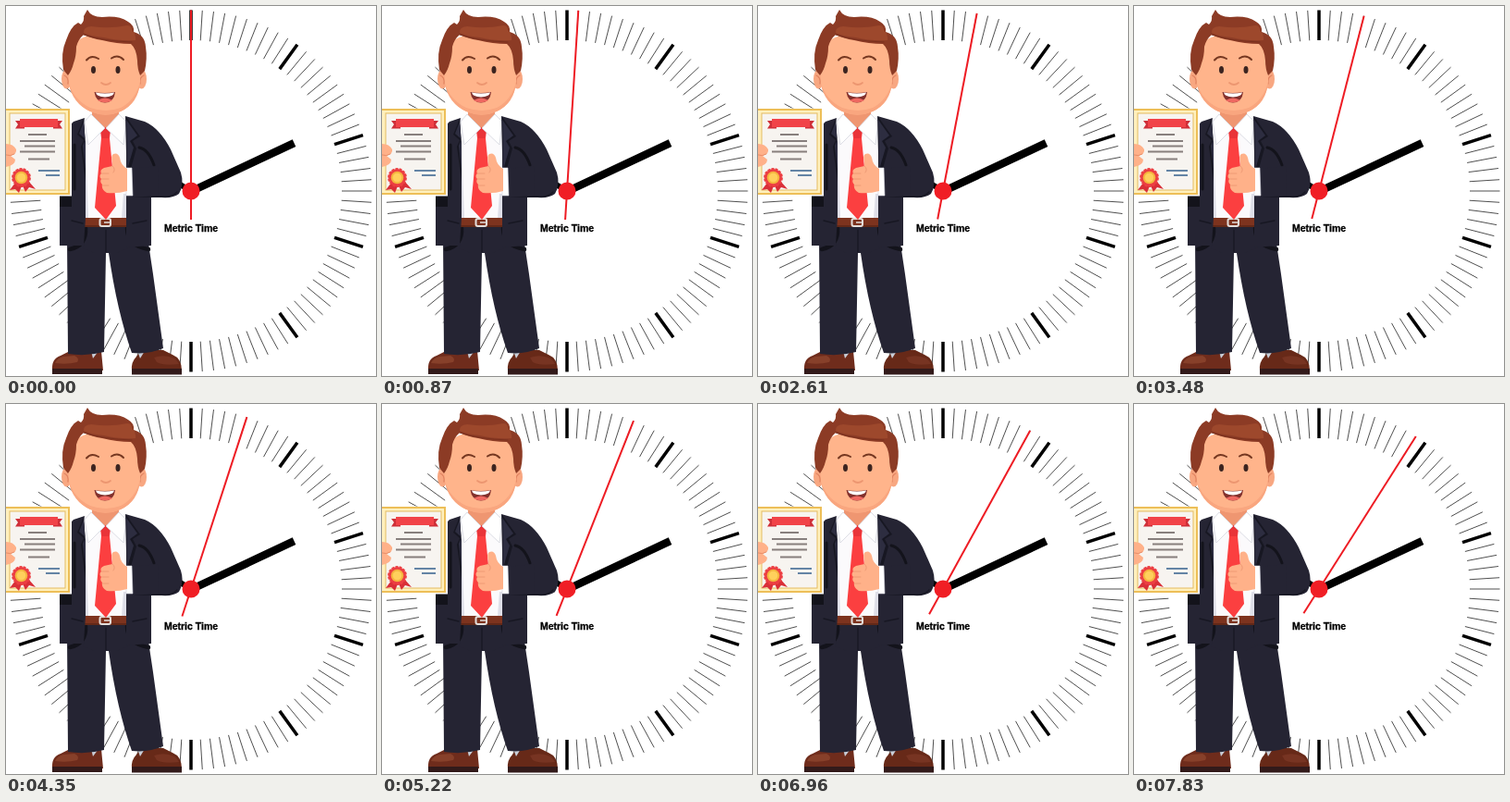
An HTML page for the animation above (8000 ms loop, 400x400 px).

```html
<!DOCTYPE html>
<html lang="en">
<head>
<meta charset="utf-8">
<title>Metric Time</title>
<style>
html, body { margin: 0; width: 100%; height: 100%; overflow: hidden; background: #fff; }
svg { display: block; width: 100vw; height: 100vh; }
.label { font: bold 10.5px Arial, "Liberation Sans", sans-serif; stroke: #000; stroke-width: .3; }
.line { fill: none; stroke-linecap: round; stroke-linejoin: round; }
</style>
</head>
<body>
<svg viewBox="0 0 400 400">
  <path id="minor" stroke="#222" stroke-width=".8"/>
  <path id="major" stroke="#000" stroke-width="3.5"/>
  <path d="M200 200L140 164" stroke="#000" stroke-width="6"/>
  <path d="M200 200.500L311.500 148.200" stroke="#000" stroke-width="8.5"/>
  <text class="label" x="200" y="244.3" text-anchor="middle">Metric Time</text>

  <g id="man">
    <!-- shoes -->
    <g id="shoes">
      <path d="M50 394Q49 381 59 378L69 373H103L105 394Z" fill="#6f2c1c"/>
      <path d="M53 386Q55 381 62 379L74 378Q80 381 77 385Q66 388 53 386Z" fill="#87402a"/>
      <path d="M50 392H104V398H50Z" fill="#321a1a"/>
      <path d="M136 394Q135 385 141 379L146 372H170L180 377Q190 381 190 394Z" fill="#672918"/>
      <path d="M160 380Q172 376 182 381Q186 384 187 387Q170 389 163 385Z" fill="#773422"/>
      <path d="M136 392H190V398.500H136Z" fill="#321a1a"/>
      <path d="M92 373L94 381L100 373ZM142 373L145 381L150 373Z" fill="#c9ced8"/>
    </g>
    <!-- trousers -->
    <path d="M66 250H153L159 290L170 370Q154 377 136 375Q120 330 111 267H108L106 374Q87 379 67 376Z" fill="#252433"/>
    <path d="M84 239H131L132 262L119 267H96L83 262Z" fill="#252433"/>
    <path class="line" d="M108 242V266" stroke="#171722" stroke-width="1.2"/>
    <path class="line" d="M86 240Q87 259 69 263M131 240Q131 259 154 263" stroke="#13131b" stroke-width="4.5"/>
    <!-- shirt and belt -->
    <path d="M84 122H130L131 231H85Z" fill="#fbfafc"/>
    <path d="M86 150L89 229H86ZM127 203H131V229H125Z" fill="#dfdfe8"/>
    <path d="M85 229H131V239H85Z" fill="#7d331e"/>
    <path d="M85 237H131V239H85Z" fill="#622817"/>
    <rect x="101.500" y="230" width="11.500" height="8" rx="2" fill="#7d331e" stroke="#e2dedb" stroke-width="2"/>
    <path d="M106 234H113" stroke="#e2dedb" stroke-width="1.500"/>
    <!-- neck, collar, tie -->
    <path d="M93 104H122V123L108 134L93 123Z" fill="#ef9671"/>
    <path d="M102 134L107 131L113 134L112 143L119 216L108 231L96 218L103 143Z" fill="#fb3f40"/>
    <path d="M102 134L107 131L113 134L111 143H104Z" fill="#e93439"/>
    <path d="M92 117L85 125L89 150L107 132ZM122 117L130 125L127 150L108 132Z" fill="#fff" stroke="#d5d6df" stroke-width=".8"/>
    <!-- jacket -->
    <path d="M85 121L73 125L68 130V204H58V259H84L86 229V158L84 127Z" fill="#252433"/>
    <path d="M129 119L150 125Q166 132 178 155L189 180Q193 193 187 203Q181 208 168 207L157 207V259L130 261V203L130 160Z" fill="#252433"/>
    <path d="M58 204H71V217H58Z" fill="#13131b"/>
    <path d="M84 122L77 139L84 145L81 152L86 190V150ZM130 120L145 141L137 146L141 154L131 190V150Z" fill="#171722"/>
    <path d="M84 125L79 138L86 144L83 151L86 177V150ZM130 123L142 140L134 146L138 153L131 177V150Z" fill="#2d2d40"/>
    <path class="line" d="M144 153Q154 155 160 172M74 150V198" stroke="#13131b" stroke-width="3"/>
    <path class="line" d="M137 206H169Q179 207 185 201M71 232L83 235M137 235L152 232" stroke="#171722" stroke-width="1.300"/>
    <!-- raised thumb -->
    <path d="M134 176L165 173L164 205L135 207Z" fill="#252433"/>
    <path d="M130 175H136L137 205H130Z" fill="#fff" stroke="#d5d6df" stroke-width=".6"/>
    <path d="M131 176Q124 172 123 164Q121 158 116 160Q113 162 115 169V173L106 175Q101 177 103 181Q100 184 103 187Q101 190 104 193Q103 199 109 202Q121 203 131 200Z" fill="#ffb189"/>
    <path class="line" d="M103 181H111M103 187H111M104 194H111M115 173Q119 176 116 180" stroke="#ee9a75" stroke-width="1"/>
    <!-- head -->
    <ellipse cx="65.500" cy="79" rx="5.500" ry="10.500" fill="#f8a781"/>
    <ellipse cx="146.500" cy="79" rx="5.500" ry="10.500" fill="#f8a781"/>
    <path class="line" d="M63 75Q68 77 67 84M149 75Q144 77 145 84" stroke="#e18461" stroke-width="1.300"/>
    <path d="M67 58Q68 30 108 30Q144 32 145 60V82Q143 105 124 114Q108 121 91 114Q72 105 68 84Z" fill="#ffb48b"/>
    <path d="M68 84Q72 105 91 114Q108 121 124 114Q143 105 145 82Q140 102 124 110Q108 116 91 110Q74 102 68 84Z" fill="#f9a67f"/>
    <path d="M67 75L62 69Q59 50 65 37Q70 22 78 18L81 20Q85 16 84 11L88 4Q92 12 104 12Q122 10 132 17Q139 21 138 28Q150 31 151 44Q153 57 150 70L145 75Q142 68 142 59Q141 46 135 41Q120 41 104 37Q92 35 84 31Q78 36 76 44Q76 54 73 62Q71 70 67 75Z" fill="#8c3b25"/>
    <path d="M84 29Q83 23 92 22Q112 25 131 21Q136 21 136 26Q141 31 140 37Q122 38 106 34Q93 33 84 29Z" fill="#9d482c"/>
    <path class="line" d="M84 31Q104 38 136 39" stroke="#7a301d"/>
    <path class="line" d="M87 58.500Q92 52.500 100 57M114 56.500Q121 52 127 58" stroke="#763821" stroke-width="2"/>
    <ellipse cx="94.500" cy="69" rx="2.500" ry="4" fill="#3c2420"/>
    <ellipse cx="121" cy="69" rx="2.500" ry="4" fill="#3c2420"/>
    <path class="line" d="M103 83Q108 87 113 83" stroke="#ec9670" stroke-width="1.700"/>
    <path d="M95.500 93Q107 95 118 93Q117 104 107 104.500Q97 104 95.500 93Z" fill="#82302c"/>
    <path d="M97 93.500Q107 95.500 117 93.500Q116 98 107 98.500Q98 98 97 93.500Z" fill="#fff"/>
    <path d="M99 102Q107 97 115 102Q107 106.500 99 102Z" fill="#ef6861"/>
  </g>

  <g id="certificate">
    <rect x="-3" y="110.500" width="74" height="95" fill="#fff"/>
    <rect x="-2" y="111" width="71" height="93" fill="#edbf58"/>
    <rect x="0" y="113" width="67" height="89" fill="#fff0bd"/>
    <rect x="4" y="116" width="60" height="83" fill="#f7f4f0" stroke="#e4bc63"/>
    <path d="M10 124H20V132.500H10L13 128ZM61 124H51V132.500H61L58 128Z" fill="#cf2f38"/>
    <path d="M15 122H56V131H15Z" fill="#f14348"/>
    <path d="M24 139H44M15 146H53M20 151.500H53M15 157.500H53M24 165.500H47" stroke="#877f7d" stroke-width="2.100"/>
    <path d="M35 178H58M43 183H58" stroke="#6484a5" stroke-width="1.900"/>
    <path d="M10 191L4 199L10 198L14 202L18 192ZM17 192L21 201L25 196L32 198L24 189Z" fill="#d92f38"/>
    <circle cx="16.500" cy="185.500" r="9.400" fill="#ec3f43" stroke="#ec3f43" stroke-width="2" stroke-dasharray="3 1.200"/>
    <circle cx="16.500" cy="185.500" r="6.800" fill="#f4b53f"/>
    <circle cx="16.500" cy="185.500" r="4.800" fill="#ffd05c"/>
    <path d="M0 149Q8 149 11 155Q12 160 5 162L10 166Q10 172 0 174Z" fill="#ffb189"/>
    <path class="line" d="M0 161Q5 163 9 160" stroke="#e88d68"/>
  </g>

  <path id="hand" d="M200 231V4.500" stroke="#ee1c24" stroke-width="2"/>
  <circle cx="200" cy="200" r="9.500" fill="#f01e25"/>
</svg>
<script>
const LOOP = 8000, STEP = 870, TICKS = 100;
const el = id => document.getElementById(id);

function tick(i) {
  const a = i / TICKS * 2 * Math.PI;
  const at = r => (200 + r * Math.sin(a)).toFixed(2) + " " + (200 - r * Math.cos(a)).toFixed(2);
  return "M" + at(163) + "L" + at(195.5);
}

const paths = { minor: "", major: "" };
for (let i = 0; i < TICKS; i++) paths[i % 10 ? "minor" : "major"] += tick(i);
for (const id in paths) el(id).setAttribute("d", paths[id]);

// One hundredth of a turn per metric second
function draw(ms) {
  const count = Math.floor((ms % LOOP) / STEP);
  el("hand").setAttribute("transform", `rotate(${count * 360 / TICKS} 200 200)`);
}

const start = performance.now();
function loop(now) {
  draw(Math.max(0, now - start));
  requestAnimationFrame(loop);
}
draw(0);
requestAnimationFrame(loop);
</script>
</body>
</html>
```
